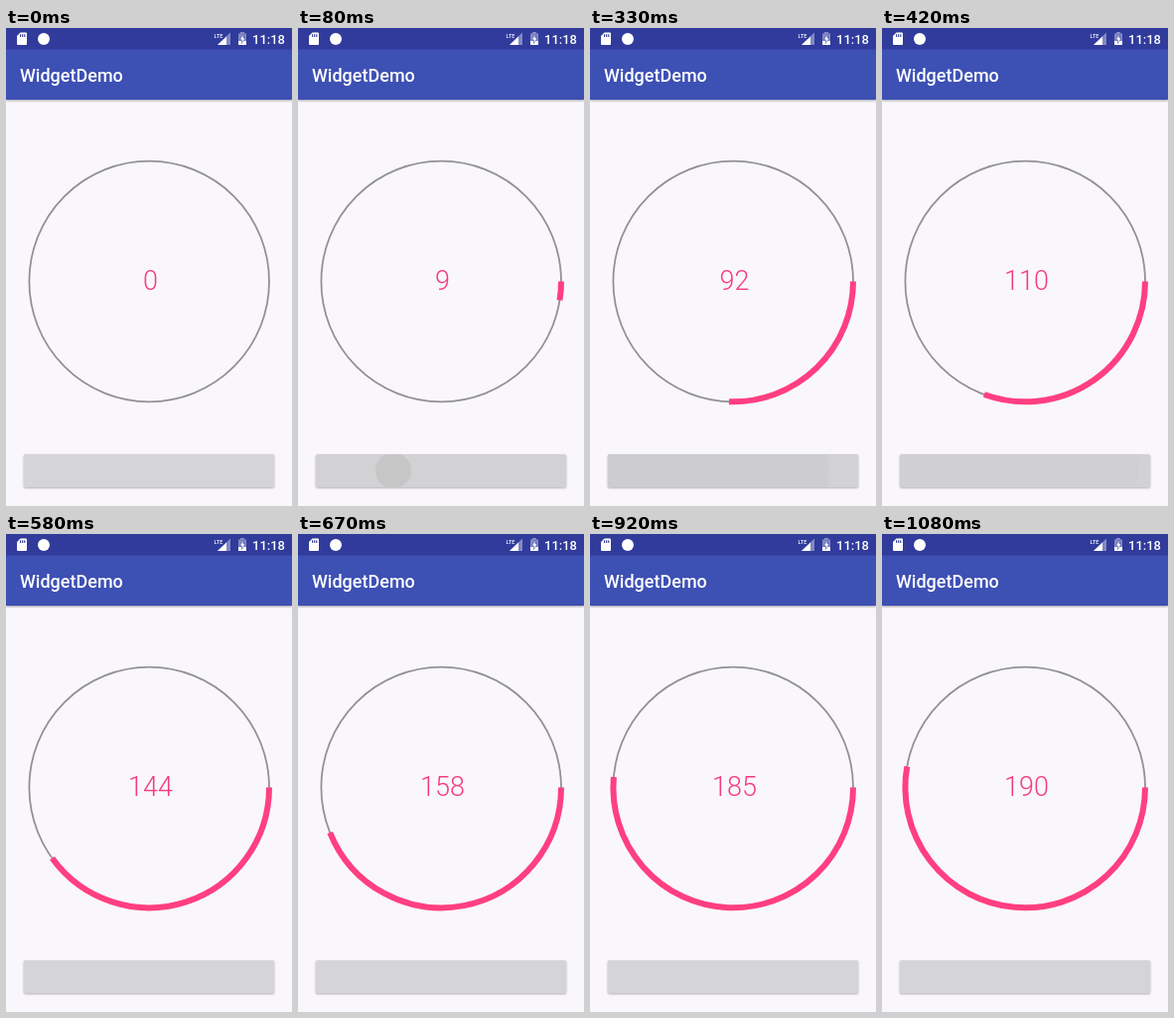
An HTML page for the animation above (1260 ms loop, 288 px wide and 480 px high).

```html
<!DOCTYPE html>
<html lang="en">
<head>
<meta charset="utf-8">
<title>WidgetDemo</title>
<style>
html, body { margin: 0; width: 100%; height: 100%; overflow: hidden; background: #f9f7fb; }
svg { display: block; width: 288px; height: 480px; font-family: Roboto, sans-serif; }
.bar { filter: drop-shadow(0 1px 1.2px rgba(0, 0, 0, .35)); }
.button { filter: drop-shadow(0 1px 1px rgba(0, 0, 0, .3)); }
</style>
</head>
<body>
<svg viewBox="0 0 288 480">
  <defs><clipPath id="face"><rect x="18" y="428" width="252" height="33" rx="1.5"/></clipPath></defs>
  <rect width="288" height="480" fill="#f9f7fb"/>

  <rect class="bar" width="288" height="72" fill="#3d50b3"/>
  <rect width="288" height="21.5" fill="#303b9c"/>
  <text x="14" y="53.5" font-size="18" font-weight="500" fill="#fff">WidgetDemo</text>

  <g fill="#fff">
    <path d="M14.5 4.5H20Q21 4.5 21 5.5V16Q21 17 20 17H12Q11 17 11 16V8Z"/>
    <path d="M14.6 6.3V9M16.7 6.3V9M18.8 6.3V9" stroke="#303b9c" stroke-width="1.1"/>
    <circle cx="38" cy="11" r="6"/>
    <path d="M226 4.5V17H213Z" opacity=".4"/>
    <path d="M222 8.4V17H213Z"/>
    <text x="209.5" y="9.5" font-size="5.5" font-weight="500">LTE</text>
    <path d="M236 5.5V4H240V5.5H242V17H234V5.5Z" opacity=".4"/>
    <path d="M234 13H242V17H234Z"/>
    <path d="M239 6.5V10H241L237.4 15.5V11.8H235.3Z" stroke="#303b9c" stroke-width=".5"/>
    <text x="248" y="16" font-size="13" font-weight="500">11:18</text>
  </g>

  <circle cx="144.2" cy="254.5" r="120.8" fill="none" stroke="#929196" stroke-width="1.8"/>
  <path id="arc" fill="none" stroke="#ff3f80" stroke-width="6"/>
  <text id="count" x="145.5" y="263" font-size="27" font-weight="300" text-anchor="middle" fill="#f43d7b"></text>

  <rect class="button" x="18" y="428" width="252" height="33" rx="1.5" fill="#d5d4d6"/>
  <g clip-path="url(#face)">
    <rect id="press" x="18" y="428" width="252" height="33"/>
    <circle id="ripple" cx="96" cy="444.5"/>
  </g>
</svg>
<script>
const $ = id => document.getElementById(id);
const LOOP = 1260;
const times = [0, 80, 170, 250, 330, 420, 500, 580, 670, 750, 830, 920, 1000, 1080];
// Decelerating sweep, in degrees, at each step
const sweep = [0, 9, 39, 67, 92, 110, 128, 144, 158, 169, 178, 185, 189, 190];
const CX = 144.2, CY = 254.5, R = 120.8;

function arcPath(deg) {
  const a = deg * Math.PI / 180;
  return `M${CX + R} ${CY}A${R} ${R} 0 ${+(deg > 180)} 1 ${CX + R * Math.cos(a)} ${CY + R * Math.sin(a)}`;
}

function draw(t) {
  const step = times.findLastIndex(start => start <= t);
  const deg = sweep[step];
  $("arc").setAttribute("d", deg ? arcPath(deg) : "");
  $("count").textContent = deg;

  const left = step ? Math.max(0, 6 - step) : 0;
  $("ripple").setAttribute("r", Math.max(0, 168 - 6 * left * left));
  $("ripple").setAttribute("opacity", left * .0112);
  $("press").setAttribute("opacity", left ? .017 : step === 6 ? .008 : 0);
}

const origin = performance.now();
function tick() {
  draw((performance.now() - origin) % LOOP);
  requestAnimationFrame(tick);
}
tick();
</script>
</body>
</html>
```
